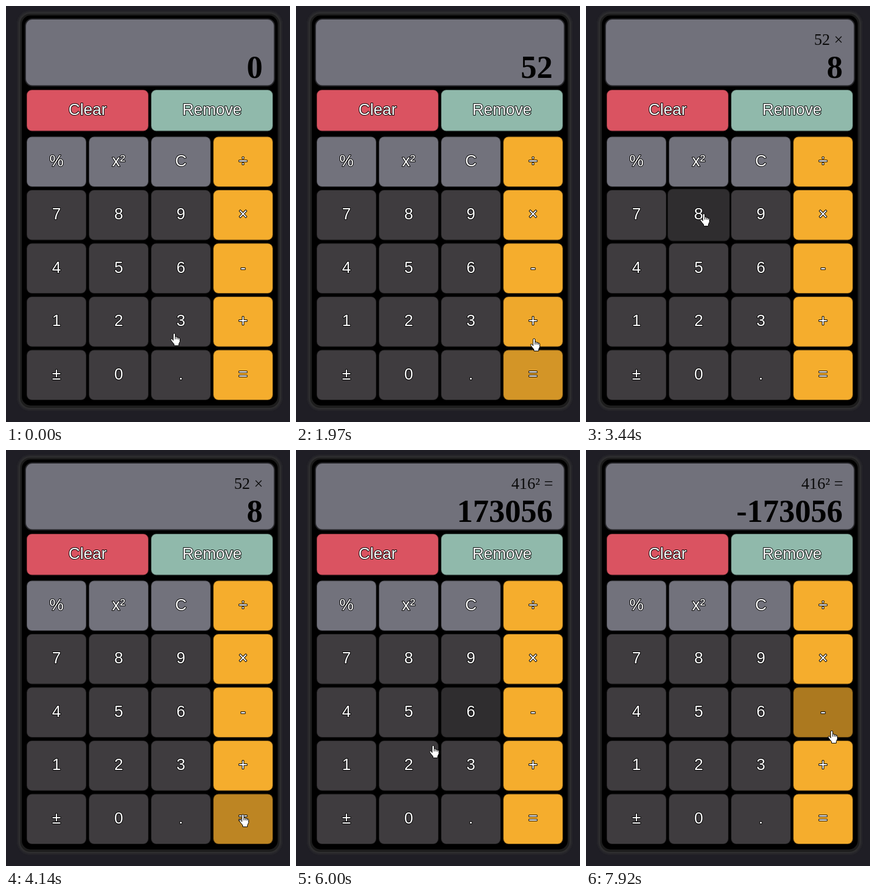
Animation of 484x706 px, one loop 7.99 s. Source, as an HTML page:

```html
<!DOCTYPE html>
<html lang="en">
<head>
<meta charset="utf-8">
<title>Calculator</title>
<style>
html, body { margin: 0; width: 100%; height: 100%; overflow: hidden; background: #1f1e25; }
svg { display: block; width: 484px; height: 706px; }
text { user-select: none; }
.label { font: 27.2px "Liberation Sans", Arial, sans-serif; text-anchor: middle; fill: #fff;
  stroke: #000; stroke-width: 2px; stroke-linejoin: round; paint-order: stroke; }
.small { font: 27.2px "Liberation Serif", "Times New Roman", serif; text-anchor: end; fill: #0a0a0a; }
.big { font: bold 54.4px "Liberation Serif", "Times New Roman", serif; text-anchor: end; fill: #000; }
.face { stroke: #000; stroke-opacity: .5; stroke-width: 2px; }
</style>
</head>
<body>
<svg viewBox="0 0 484 706" xmlns="http://www.w3.org/2000/svg">
  <defs>
    <filter id="soft" x="-10%" y="-10%" width="120%" height="120%"><feGaussianBlur stdDeviation="2"/></filter>
  </defs>
  <rect width="484" height="706" fill="#1f1e25"/>
  <rect x="21" y="10" width="448" height="675" rx="20" fill="#303030" filter="url(#soft)"/>
  <rect x="24" y="13" width="442" height="669" rx="17" fill="#1d1d1d"/>
  <rect x="27" y="16" width="436" height="662" rx="15" fill="#000"/>
  <rect x="33" y="22" width="424.5" height="113.5" rx="12" fill="#71717b" stroke="#26262a" stroke-width="2"/>
  <text id="small" class="small" x="438" y="66"></text>
  <text id="big" class="big" x="437.5" y="122"></text>
  <g id="keys"></g>
  <g id="hand" fill="#fff" stroke="#000" stroke-width="1" stroke-linejoin="round">
    <path d="M5 12.5V2Q5 .5 6.7 .5T8.5 2V6Q10.8 5.4 11.2 7Q13.4 6.5 13.9 8Q16.5 7.6 16.5 10V14.5L14.5 18.5V21.5H6.5V19L3.2 15L.8 11.6Q.4 9.7 2.2 9.7Q3.4 10 5 12.5Z"/>
    <path fill="none" d="M8.5 6V10.5M11.3 7V10.5M14 8V11"/>
  </g>
</svg>
<script>
const LOOP = 7990, STEP = 10, FADE = 300, PRESS = 140;
const NS = "http://www.w3.org/2000/svg";
const $ = id => document.getElementById(id);

function add(parent, tag, attrs, text) {
  const el = document.createElementNS(NS, tag);
  for (const k in attrs) el.setAttribute(k, attrs[k]);
  if (text) el.textContent = text;
  return parent.appendChild(el);
}

const GRAY = [114, 114, 124], DARK = [63, 60, 63], ORANGE = [245, 173, 45];
const keys = {};

function addKey(label, x, y, w, h, color) {
  const g = add($("keys"), "g", {});
  const face = add(g, "rect", { class: "face", x, y, width: w, height: h, rx: 9 });
  const cx = x + w / 2, cy = y + h / 2;
  add(g, "text", { class: "label", x: cx, y: Math.floor(cy + 8) }, label);
  keys[label] = { x, y, w, h, cx, cy, color, g, face, levels: [] };
}

addKey("Clear", 35, 142, 208, 70.5, [218, 83, 97]);
addKey("Remove", 247, 142, 208, 70.5, [144, 185, 171]);
["% x² C ÷", "7 8 9 ×", "4 5 6 -", "1 2 3 +", "± 0 . ="].forEach((row, r) =>
  row.split(" ").forEach((label, c) =>
    addKey(label, 35 + 106 * c, 221.5 + 90.5 * r, 102, 85.5, c === 3 ? ORANGE : r ? DARK : GRAY)));

// The pointer rests near a key's centre, then moves straight to the next stop
const stops = [];
function stop(key, dx, dy, arrive, leave, press) {
  stops.push({ key, x: keys[key].cx + dx, y: keys[key].cy + dy, arrive, leave, press });
}
stop("3", -12, 19, 0, 70);
stop("5", 13, 0, 410, 1120, 1020);
stop("2", 8, -11, 1300, 1480, 1340);
stop("=", -19, -23, 1800, 1870);
stop("+", 1, 29, 1970, 1970);
stop("×", -9, -4, 2480, 2900, 2740);
stop("8", 8, -3, 3260, 3570, 3380);
stop("=", -1, -8, 3955, 4420, 4240);
stop("x²", 3, -9, 5000, 5450, 5220);
stop("6", -36, -5, 5700, 5880);
stop("2", 41, -35, 6000, 6000);
stop("±", 2, -12, 6560, 7020, 6890);
stop("-", 8, -1, 7450, 7650);
stop("-", 14, 31, 7920, LOOP);
const presses = stops.filter(s => s.press);

function pointer(t) {
  const i = stops.findIndex(s => t <= s.leave);
  const to = stops[i];
  if (t >= to.arrive) return [to.x, to.y];
  const from = stops[i - 1];
  const f = (t - from.leave) / (to.arrive - from.leave);
  return [from.x + (to.x - from.x) * f, from.y + (to.y - from.y) * f];
}

// Calculator state after one more key
function enter(s, key) {
  if (key === "×") return { small: `${s.big} ×`, big: s.big, held: s.big, fresh: true };
  if (key === "=") return { small: `${s.small} ${s.big} =`, big: String(s.held * s.big), fresh: true };
  if (key === "x²") return { small: `${s.big}² =`, big: String(s.big ** 2), fresh: true };
  if (key === "±") return { ...s, big: String(-s.big) };
  return { ...s, big: s.fresh ? key : s.big + key, fresh: false };
}

function display(t) {
  return presses.filter(p => t >= p.press + 50)
    .reduce((s, p) => enter(s, p.key), { small: "", big: "0", fresh: true });
}

// Hover levels follow from the pointer's motion
for (const k of Object.values(keys)) {
  let level = 0;
  for (let t = 0; t <= LOOP; t += STEP) {
    k.levels.push(level);
    const [px, py] = pointer(t);
    const over = Math.abs(px - k.cx) <= k.w / 2 && Math.abs(py - k.cy) <= k.h / 2;
    level = Math.min(1, Math.max(0, level + (over ? STEP : -STEP) / FADE));
  }
}

function draw(t) {
  const shown = display(t);
  $("small").textContent = shown.small;
  $("big").textContent = shown.big;

  const down = presses.find(p => t >= p.press && t < p.press + PRESS);
  for (const label in keys) {
    const k = keys[label];
    const shade = 1 - 0.3 * k.levels[Math.floor(t / STEP)];
    k.face.setAttribute("fill", `rgb(${k.color.map(v => Math.round(v * shade))})`);
    const s = down && down.key === label ? 1 + 0.045 * Math.sin(Math.PI * (t - down.press) / PRESS) : 1;
    k.g.setAttribute("transform", `translate(${k.cx * (1 - s)} ${k.cy * (1 - s)}) scale(${s})`);
  }

  const [x, y] = pointer(t);
  $("hand").setAttribute("transform", `translate(${Math.round(x) - 6} ${Math.round(y)})`);
}

const start = performance.now();
function tick() {
  draw((performance.now() - start) % LOOP);
  requestAnimationFrame(tick);
}
tick();
</script>
</body>
</html>
```
